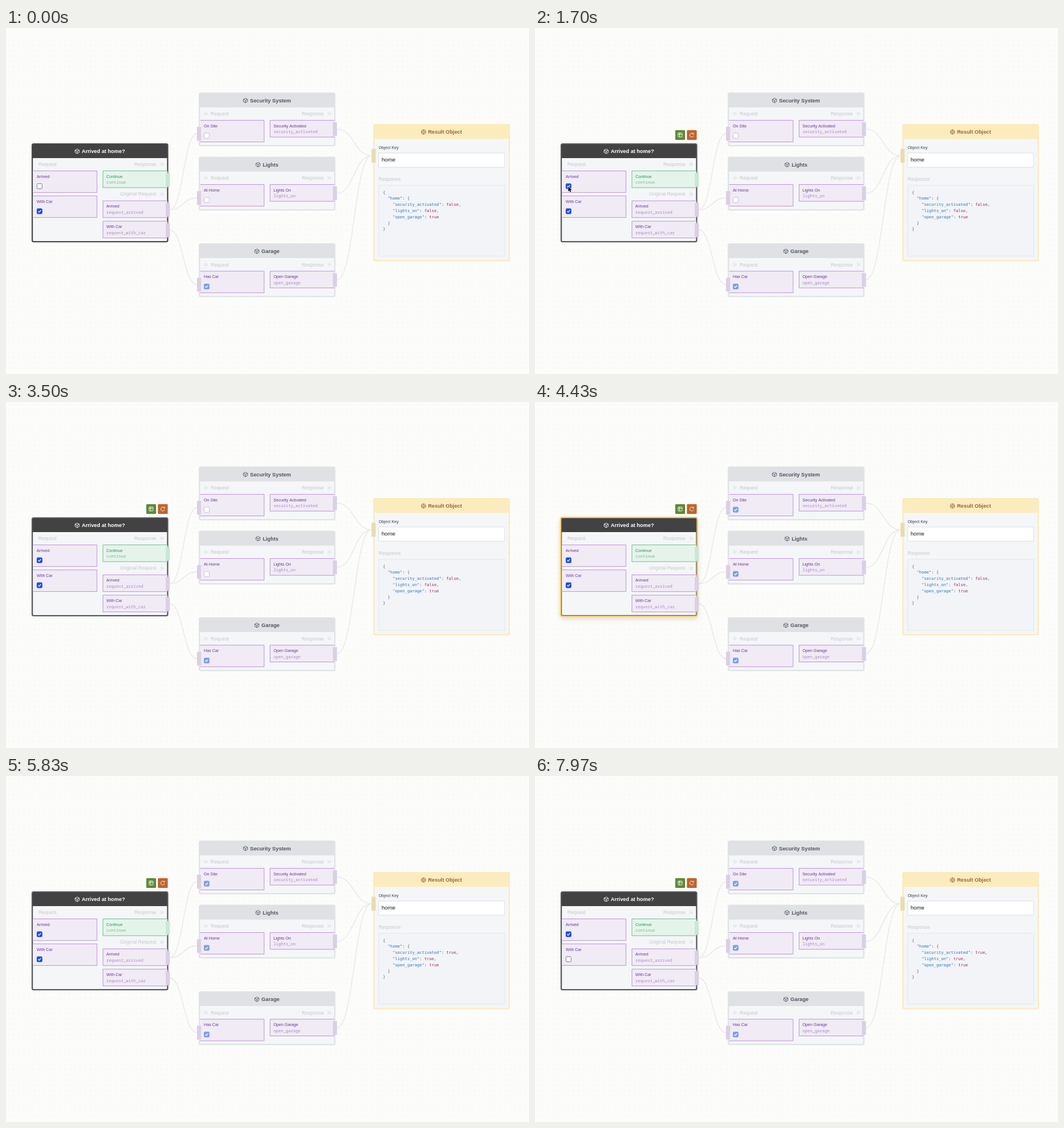
Recreate the animation shown at these times as an HTML page with a canvas. Size 920 by 609 pixels, loop 8000 ms.

```html
<!DOCTYPE html>
<html lang="en">
<head>
<meta charset="utf-8">
<title>Home automation flow</title>
<style>
html, body { margin: 0; width: 100%; height: 100%; overflow: hidden; background: #fcfcfa; }
canvas { display: block; width: 920px; height: 609px; }
</style>
</head>
<body>
<canvas id="stage"></canvas>
<script>
const W = 920, H = 609, LOOP = 8000;
const canvas = document.getElementById('stage');
const dpr = window.devicePixelRatio || 1;
canvas.width = W * dpr;
canvas.height = H * dpr;
const ctx = canvas.getContext('2d');

const SANS = '"Liberation Sans", Arial, sans-serif';
const FONT = {
  title: `bold 9.25px ${SANS}`,
  section: `8.6px ${SANS}`,
  label: `7.2px ${SANS}`,
  input: `9.7px ${SANS}`,
  slug: '7.18px "Noto Sans Mono", monospace',
  code: '7.13px "DejaVu Sans Mono", monospace'
};
const PURPLE = { fill: '#f0ebf4', line: '#bd86dc', label: '#6a35a0', slug: '#b084cc', handle: '#dbcfe5' };
const GREEN = { fill: '#e5f4eb', line: '#66b88b', label: '#2c9358', slug: '#70be92', handle: '#c8e8d5' };
const BODY = '#f4f6f8', MUTED = '#c6c8cc';

// Moments at which the state changes
const ARRIVED_ON = 1500, CHECKS_ON = 4300, RESULT_ON = 4800, CAR_OFF = 7100;

const PATHS = [
  [[540, -8, 372], [1000, 55.5, 305.5], [1250, 58.5, 279], [1800, 58.5, 279],
   [2130, 24, 334], [2370, 1, 355], [2460, -10, 364]],
  [[6350, -8, 404], [6390, 4, 399], [6470, 45.5, 381.5], [6800, 58.5, 323],
   [7250, 58.5, 323], [7500, 26, 352], [7720, -10, 382]]
];

const clamp = v => Math.max(0, Math.min(1, v));
const smooth = v => { v = clamp(v); return v * v * (3 - 2 * v); };
const pulse = (t, from, to) => smooth((t - from) / 150) * smooth((to - t) / 250);

function text(str, x, y, font, color, align = 'left') {
  ctx.font = font;
  ctx.fillStyle = color;
  ctx.textAlign = align;
  ctx.fillText(str, x, y);
}

function box(x, y, w, h, r, fill, line, width = 1) {
  ctx.beginPath();
  ctx.roundRect(x, y, w, h, r);
  if (fill) { ctx.fillStyle = fill; ctx.fill(); }
  if (line) { ctx.strokeStyle = line; ctx.lineWidth = width; ctx.stroke(); }
}

function lines(color, width, ...paths) {
  ctx.strokeStyle = color;
  ctx.lineWidth = width;
  ctx.beginPath();
  for (const p of paths) p.forEach(([x, y], i) => i ? ctx.lineTo(x, y) : ctx.moveTo(x, y));
  ctx.stroke();
}

function dots() {
  ctx.fillStyle = '#e9e9e6';
  for (let y = 4; y < H; y += 9)
    for (let x = 4; x < W; x += 9) ctx.fillRect(x, y, 1, 1);
}

function wire(x1, y1, x2, y2) {
  const mid = (x1 + x2) / 2;
  ctx.strokeStyle = '#e9e9ea';
  ctx.lineWidth = 1.5;
  ctx.beginPath();
  ctx.moveTo(x1, y1);
  ctx.bezierCurveTo(mid, y1, mid, y2, x2, y2);
  ctx.stroke();
}

function cube(x, y, color) {
  lines(color, 0.9,
    [[x, y - 4], [x + 3.6, y - 2], [x + 3.6, y + 2], [x, y + 4], [x - 3.6, y + 2], [x - 3.6, y - 2], [x, y - 4]],
    [[x - 3.6, y - 2], [x, y], [x + 3.6, y - 2]], [[x, y], [x, y + 4]]);
}

function target(x, y, color) {
  ctx.strokeStyle = color;
  ctx.lineWidth = 0.9;
  for (const r of [3.9, 1.7]) {
    ctx.beginPath();
    ctx.arc(x, y, r, 0, Math.PI * 2);
    ctx.stroke();
  }
  lines(color, 0.8, [[x - 4, y], [x - 1.7, y]], [[x + 1.7, y], [x + 4, y]],
    [[x, y - 4], [x, y - 1.7]], [[x, y + 1.7], [x, y + 4]]);
}

function chevrons(x, y) {
  for (const d of [0, 3.2])
    lines(MUTED, 0.8, [[x + d, y - 2.6], [x + d + 2.6, y], [x + d, y + 2.6]]);
}

function checkbox(x, y, on, disabled) {
  const color = disabled ? '#7f9fe6' : '#1f50d6';
  box(x - 4.5, y - 4.5, 9, 9, 1.5, on ? color : '#fff', on ? color : disabled ? '#c3c4ca' : '#777980');
  if (on) lines('#fff', 1.2, [[x - 2.4, y], [x - 0.7, y + 1.8], [x + 2.5, y - 1.9]]);
}

// Frame, header and centred title; glow is the strength of the amber highlight
function shell(x, y, h, title, style, glow) {
  const w = 240.5;
  if (glow > 0) {
    ctx.save();
    ctx.shadowColor = `rgba(110, 100, 70, ${0.24 * glow})`;
    ctx.shadowBlur = 10 * dpr;
    ctx.shadowOffsetY = 4 * dpr;
    box(x, y, w, h, 3.5, style.border);
    ctx.restore();
  }
  box(x, y, w, h, 3.5, style.border);
  box(x + 2.3, y + 26, w - 4.6, h - 28.3, [0, 0, 1.5, 1.5], BODY);
  box(x + 2, y + 2, w - 4, 24, [2, 2, 0, 0], style.header);
  if (glow > 0) {
    ctx.globalAlpha = glow;
    if (style.dark) box(x - 0.8, y - 0.8, w + 1.6, h + 1.6, 4, null, '#fbe196', 1.6);
    box(x + 0.6, y + 0.6, w - 1.2, h - 1.2, 3, null, '#f1c052', 1.3);
    ctx.globalAlpha = 1;
  }
  ctx.font = FONT.title;
  const left = x + w / 2 - (ctx.measureText(title).width + 12) / 2;
  style.icon(left + 4, y + 14, style.title);
  text(title, left + 12, y + 17.3, FONT.title, style.title);
}

function inputField(x, y, label, on, disabled) {
  box(x, y, 113, 39, 0, PURPLE.fill);
  lines(PURPLE.line, 0.9, [[x, y + 0.5], [x + 112.5, y + 0.5], [x + 112.5, y + 38.5], [x, y + 38.5]]);
  text(label, x + 6.5, y + 12.7, FONT.label, PURPLE.label);
  checkbox(x + 11.5, y + 27.5, on, disabled);
}

function outputField(x, y, label, slug, c) {
  box(x, y, 114, 30.5, 0, c.fill);
  lines(c.line, 0.9, [[x + 114, y + 0.5], [x + 0.5, y + 0.5], [x + 0.5, y + 30], [x + 114, y + 30]]);
  text(label, x + 6.5, y + 12.7, FONT.label, c.label);
  text(slug, x + 6.7, y + 23, FONT.slug, c.slug);
  handle(x + 111, y + 4, c.handle);
}

function handle(x, y, color) {
  ctx.fillStyle = color;
  ctx.fillRect(x, y, 7.2, 24.3);
}

const GREY = { border: '#e0e3e6', header: '#dfe1e4', title: '#50545f', icon: cube };
const GOLD = { border: '#fbebbb', header: '#fcecbd', title: '#9a6534', icon: target };

function deviceNode(y, title, input, output, slug, on, glow) {
  const x = 339;
  shell(x, y, 94.7, title, GREY, glow);
  chevrons(x + 9.5, y + 37.5);
  text('Request', x + 21, y + 40.5, FONT.section, MUTED);
  text('Response', x + 220, y + 40.5, FONT.section, MUTED, 'right');
  chevrons(x + 227, y + 37.5);
  inputField(x + 2.5, y + 48.5, input, on, true);
  handle(x - 3, y + 60.5, PURPLE.handle);
  outputField(x + 125, y + 48.5, output, slug, PURPLE);
}

function startNode(t) {
  const x = 45, y = 203, selected = t >= ARRIVED_ON;
  const style = { border: selected ? '#58595d' : '#4a4a4d', header: '#424242', title: '#fff', icon: cube, dark: true };
  shell(x, y, 174.3, 'Arrived at home?', style, pulse(t, 4230, 4800));
  text('Request', 57, 243, FONT.section, MUTED);
  text('Response', 264.5, 243, FONT.section, MUTED, 'right');
  chevrons(271.5, 240);
  text('Original Request', 264.5, 295.4, FONT.section, MUTED, 'right');
  chevrons(271.5, 292.5);
  inputField(47.5, 251, 'Arrived', selected, false);
  inputField(47.5, 295, 'With Car', t < CAR_OFF, false);
  outputField(170, 251, 'Continue', 'continue', GREEN);
  outputField(170, 303.7, 'Arrived', 'request_arrived', PURPLE);
  outputField(170, 339.5, 'With Car', 'request_with_car', PURPLE);
  if (selected) toolbar();
}

function toolbar() {
  box(246.7, 179.7, 17.3, 17.3, 1.5, '#5f8a36');
  box(267.2, 179.7, 17.3, 17.3, 1.5, '#c0642d');
  box(251.8, 184.8, 7, 7, 1, null, '#fff', 0.9);
  lines('#fff', 0.9, [[251.8, 187.2], [258.8, 187.2]], [[254.4, 184.8], [254.4, 191.8]]);
  ctx.beginPath();
  ctx.arc(275.7, 188.4, 3.3, 0.25, Math.PI * 1.75);
  ctx.stroke();
  lines('#fff', 0.9, [[279, 184.4], [279, 186.8], [276.6, 186.8]]);
}

function resultNode(t) {
  const x = 646, y = 169;
  shell(x, y, 241.8, 'Result Object', GOLD, 0.85 * pulse(t, 4800, 5500));
  handle(643, 212.7, '#eadcae');
  text('Object Key', 655.5, 213, FONT.label, '#3b404d');
  box(655.5, 220, 221.5, 25, 1, '#fff', '#dadee4');
  text('home', 660.7, 235.3, FONT.input, '#16181d');
  text('Response', 655.5, 268.6, FONT.section, MUTED);
  ctx.setLineDash([1, 1]);
  box(655.5, 276.8, 222, 125, 0, '#f2f4f7', '#d3d8e0');
  ctx.setLineDash([]);
  json(663, 291.6, t >= RESULT_ON);
}

function json(x, y, active) {
  const rows = [
    [0, '', '{'], [2, '"home"', ': {'],
    [4, '"security_activated"', ': ', String(active), ','],
    [4, '"lights_on"', ': ', String(active), ','],
    [4, '"open_garage"', ': ', 'true', ''],
    [2, '', '}'], [0, '', '}']
  ];
  const colors = ['#2f78ba', '#5d6470', '#a02c63', '#5d6470'];
  ctx.font = FONT.code;
  const cell = ctx.measureText('0').width;
  rows.forEach(([indent, ...parts], row) => {
    let col = indent;
    parts.forEach((part, i) => {
      text(part, x + col * cell, y + row * 10.8, FONT.code, colors[i]);
      col += part.length;
    });
  });
}

function polygon(points, fill, line, width) {
  ctx.beginPath();
  points.forEach(([x, y], i) => i ? ctx.lineTo(x, y) : ctx.moveTo(x, y));
  ctx.closePath();
  ctx.lineJoin = 'round';
  ctx.strokeStyle = line;
  ctx.lineWidth = width;
  ctx.stroke();
  ctx.fillStyle = fill;
  ctx.fill();
}

function arrow() {
  polygon([[0, 0], [0, 9], [2.1, 7.1], [3.5, 10.2], [5, 9.5], [3.6, 6.5], [6.4, 6.3]], '#000', '#fff', 1.4);
}

function hand() {
  polygon([[-2.4, 5], [-4.4, 1.2], [-3.6, 0.3], [-2.4, 1.2], [-3, -3], [-1.9, -3.5], [-1, -4.6],
    [0.1, -3.9], [1.4, -4.3], [2.1, -3], [3.5, -2.8], [3.9, 1.2], [2.8, 5]], '#fff', '#111', 1.7);
  lines('#222', 0.7, [[-1.2, -3], [-0.8, -0.4]], [[0.6, -3.4], [0.7, -0.4]], [[2.2, -2.6], [2.1, -0.2]]);
}

function cursor(t) {
  const path = PATHS.find(p => t >= p[0][0] && t < p[p.length - 1][0]);
  if (!path) return;
  const i = path.findIndex(k => k[0] > t);
  const [t0, x0, y0] = path[i - 1], [t1, x1, y1] = path[i];
  const k = (t - t0) / (t1 - t0);
  const x = x0 + (x1 - x0) * k, y = y0 + (y1 - y0) * k;
  ctx.save();
  ctx.translate(x, y);
  if (x > 45 && x < 286 && y > 203 && y < 378) arrow();
  else hand();
  ctx.restore();
}

function draw(t) {
  ctx.setTransform(dpr, 0, 0, dpr, 0, 0);
  ctx.lineJoin = 'miter';
  ctx.fillStyle = '#fcfcfa';
  ctx.fillRect(0, 0, W, H);
  dots();
  wire(288, 319.8, 336, 186);
  wire(288, 319.8, 336, 299);
  wire(288, 355.6, 336, 451.7);
  for (const y of [178, 291, 443.5]) wire(582, y, 643, 224.8);
  const on = t >= CHECKS_ON, glow = pulse(t, 4650, 5400);
  deviceNode(113.5, 'Security System', 'On Site', 'Security Activated', 'security_activated', on, glow);
  deviceNode(226.5, 'Lights', 'At Home', 'Lights On', 'lights_on', on, glow);
  deviceNode(379, 'Garage', 'Has Car', 'Open Garage', 'open_garage', true, 0);
  resultNode(t);
  startNode(t);
  cursor(t);
}

const start = performance.now();
function tick() {
  draw((performance.now() - start) % LOOP);
  requestAnimationFrame(tick);
}
tick();
</script>
</body>
</html>
```
